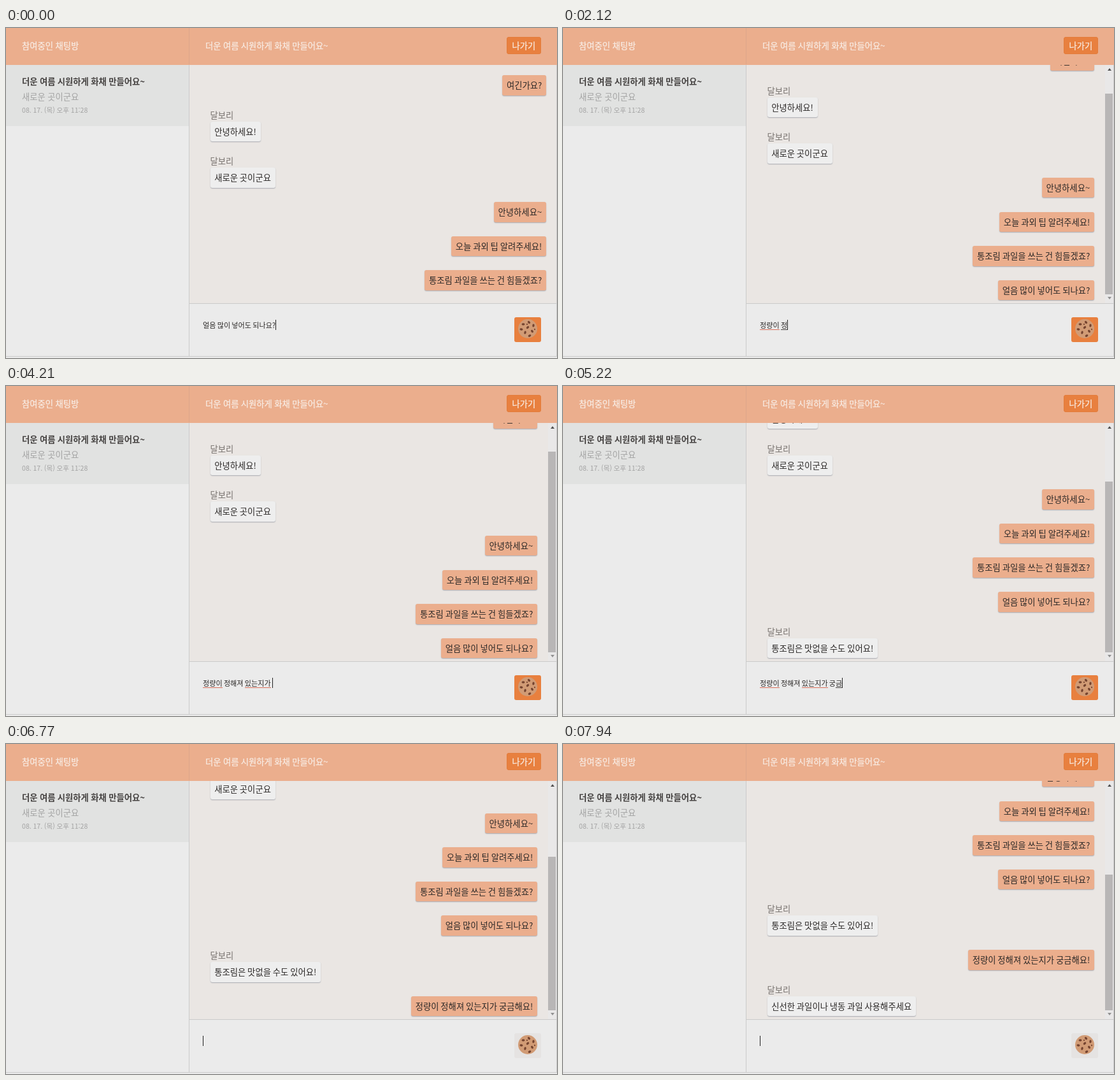
An HTML page for the animation above (8000 ms loop, 865 by 518 pixels).

```html
<!DOCTYPE html>
<html lang="ko">
<head>
<meta charset="utf-8">
<style>
  html, body { margin: 0; width: 100%; height: 100%; overflow: hidden; }
  body { position: relative; background: #ebebeb; color: #2b2827; word-spacing: -.35px;
    font: 13.33px "Noto Sans CJK KR", "Noto Sans CJK", sans-serif; }
  div { position: absolute; white-space: pre; box-sizing: border-box; }
  .head { left: 0; top: 0; width: 865px; height: 58px; background: #ebae8d; z-index: 1; }
  .head div { top: 0; line-height: 56px; color: #f8ece4; -webkit-text-stroke: .25px; }
  .head .exit { left: 786px; top: 14px; width: 54px; height: 27px; line-height: 26px;
    text-align: center; border-radius: 3px; background: #e8803f; border: 1px solid #e27c3c; }
  .room { left: 0; top: 57px; width: 287px; height: 97px; background: #e1e2e1; color: #a3a3a3; }
  .room div { left: 25px; line-height: 20px; }
  .line { background: #cacaca; }
  #feed, #input { word-spacing: -.85px; }
  #feed { left: 288px; top: 57px; width: 576px; height: 375px; overflow: hidden; background: #eae6e3; }
  .msg { height: 31.5px; line-height: 31px; padding: 0 6.7px; border-radius: 3px;
    background: #eeeeee; box-shadow: 0 1px 1.5px #a9abb2; }
  .mine { background: #ebae8d; }
  .name { left: 32.5px; line-height: 20px; color: #77716e; }
  #bar { left: 851px; top: 57px; width: 13px; height: 375px; background: #e9e8e8; }
  #thumb { left: 0; width: 12px; bottom: 14px; background: #b8b6b6; }
  .arrow { left: 3.5px; border: 3px solid transparent; }
  #input { left: 309px; top: 458px; height: 16px; line-height: 16px; font-size: 11.1px; }
  #input span { display: inline-block; height: 16px; box-sizing: border-box; vertical-align: top; }
  #input .typo { border-bottom: 1px solid #d8705c; }
  #input .live { border-bottom: 1px solid #4a4543; }
  #caret { top: 458px; width: 1px; height: 16px; background: #222; }
  #send { left: 798px; top: 454px; width: 42px; height: 39px; border-radius: 3px; }
  #send svg { position: absolute; left: 0; top: 0; }
</style>
</head>
<body>
<div class="head">
  <div style="left:25px">참여중인 채팅방</div>
  <div style="left:313px">더운 여름 시원하게 화채 만들어요~</div>
  <div class="exit">나가기</div>
  <div style="left:287px;width:1px;height:57px;background:#dca58a"></div>
</div>
<div class="room">
  <div style="top:17px;font-weight:700;color:#454241">더운 여름 시원하게 화채 만들어요~</div>
  <div style="top:41px">새로운 곳이군요</div>
  <div style="top:62px;font-size:10.67px">08. 17. (목) 오후 11:28</div>
</div>
<div id="feed"></div>
<div id="bar">
  <div class="arrow" style="top:3px;border-bottom:4px solid #505050"></div>
  <div id="thumb"></div>
  <div class="arrow" style="bottom:3px;border-top:4px solid #909090"></div>
</div>
<div class="line" style="left:287px;top:57px;width:1px;height:458px"></div>
<div class="line" style="left:864px;top:57px;width:1px;height:458px"></div>
<div class="line" style="left:288px;top:432px;width:577px;height:1px"></div>
<div class="line" style="left:0;top:515px;width:865px;height:1px"></div>
<div id="input"></div>
<div id="caret"></div>
<div id="send">
  <svg width="42" height="39" viewBox="-21 -18 42 39">
    <circle r="15" fill="#d19b75"/>
    <g id="chips" fill="#74432f"></g>
  </svg>
</div>
<script>
const $ = id => document.getElementById(id);
const LOOP = 8000, VIEW = 375, TRACK = 347, PEER = '달보리';

// [arrival time, is mine, text]
const messages = [
  [0, 1, '여긴가요?'],
  [0, 0, '안녕하세요!'],
  [0, 0, '새로운 곳이군요'],
  [0, 1, '안녕하세요~'],
  [0, 1, '오늘 과외 팁 알려주세요!'],
  [0, 1, '통조림 과일을 쓰는 건 힘들겠죠?'],
  [210, 1, '얼음 많이 넣어도 되나요?'],
  [4900, 0, '통조림은 맛없을 수도 있어요!'],
  [6030, 1, '정량이 정해져 있는지가 궁금해요!'],
  [7800, 0, '신선한 과일이나 냉동 과일 사용해주세요']
];

// Each run: text already committed, then [time, syllables being composed]
const runs = [
  ['', [0, '얼음 많이 넣어도 되나요?'], [210, ''], [880, 'ㅈ'], [980, '저'], [1080, '정'],
    [1150, '정ㄹ'], [1250, '정랴'], [1350, '정량'], [1480, '정량ㅇ'], [1600, '정량이']],
  ['정량이 ', [1700, ''], [1840, 'ㅈ'], [1980, '저'], [2120, '정'], [2320, '정ㅎ'], [2390, '정해'],
    [2660, '정해ㅈ'], [2760, '정해져']],
  ['정량이 정해져 ', [2860, ''], [3000, 'ㅇ'], [3100, '이'], [3200, '있'], [3330, '있ㄴ'], [3450, '있느'],
    [3570, '있는'], [3740, '있는ㅈ'], [3810, '있는지'], [3950, '있는직'], [4080, '있는지가']],
  ['정량이 정해져 있는지가 ', [4210, ''], [4420, 'ㄱ'], [4550, '구'], [4690, '궁'], [4830, '궁ㄱ'],
    [4960, '궁그'], [5150, '궁금'], [5290, '궁금ㅎ'], [5360, '궁금해'], [5490, '궁금해ㅇ'],
    [5620, '궁금해요'], [5760, '궁금해요!']],
  ['', [6030, '']]
];
const steps = runs.flatMap(([done, ...keys]) => keys.map(([at, text]) => [at, done, text]));
const typos = ['정량이', '있는지가'];
const caretOff = [[6100, 6630], [7190, 7800]];

function add(className, text) {
  const el = document.createElement('div');
  el.className = className;
  el.textContent = text;
  return $('feed').appendChild(el);
}

let nextY = 17;
const rows = messages.map(([at, mine, text], i) => {
  if (i) nextY += mine ? 53.6 : 72.7;
  return { at, mine, y: nextY, box: add(mine ? 'msg mine' : 'msg', text), name: mine ? null : add('name', PEER) };
});

$('chips').innerHTML = [[-7, -7], [2, -10], [9, -5], [0, -2], [-10, 1], [7, 4], [-4, 6], [3, 11], [-1, -7], [11, 1]]
  .map(([x, y], i) => `<ellipse cx="${x}" cy="${y}" rx="${i < 8 ? 2.5 : 1.2}" ry="${i < 8 ? 1.7 : 1}" transform="rotate(${i * 47} ${x} ${y})"/>`)
  .join('');

function drawFeed(t) {
  const last = rows.filter(r => t >= r.at).pop();
  const scroll = Math.max(0, last.y - 338.7);
  const overflow = scroll > 0;
  for (const { at, mine, y, box, name } of rows) {
    box.style.display = t < at ? 'none' : '';
    box.style.top = y - scroll + 'px';
    box.style[mine ? 'right' : 'left'] = mine ? (overflow ? 30 : 16) + 'px' : '32.5px';
    if (name) {
      name.style.display = box.style.display;
      name.style.top = y - scroll - 20 + 'px';
    }
  }
  $('bar').style.display = overflow ? '' : 'none';
  $('thumb').style.height = TRACK * VIEW / (VIEW + scroll) + 'px';
}

function drawInput(t) {
  const [, done, text] = steps.filter(s => t >= s[0]).pop();
  const composing = /[ㄱ-ㅎ가-힣]$/.test(text);
  const cut = composing ? text.length - 1 : text.length;
  const words = done.split(' ').map(w => typos.includes(w) ? `<span class="typo">${w}</span>` : w).join(' ');
  const html = words + text.slice(0, cut) + (composing ? `<span class="live">${text.slice(cut)}</span>` : '');
  if ($('input').dataset.html !== html) {
    $('input').dataset.html = html;
    $('input').innerHTML = html;
  }
  $('caret').style.left = 309 + $('input').getBoundingClientRect().width + 'px';
  $('caret').style.display = caretOff.some(([a, b]) => t >= a && t < b) ? 'none' : '';
  $('send').style.background = done + text ? '#e8803f' : '#e5e3e2';
}

const start = performance.now();
function frame() {
  const t = (performance.now() - start) % LOOP;
  drawFeed(t);
  drawInput(t);
  requestAnimationFrame(frame);
}
frame();
</script>
</body>
</html>
```
